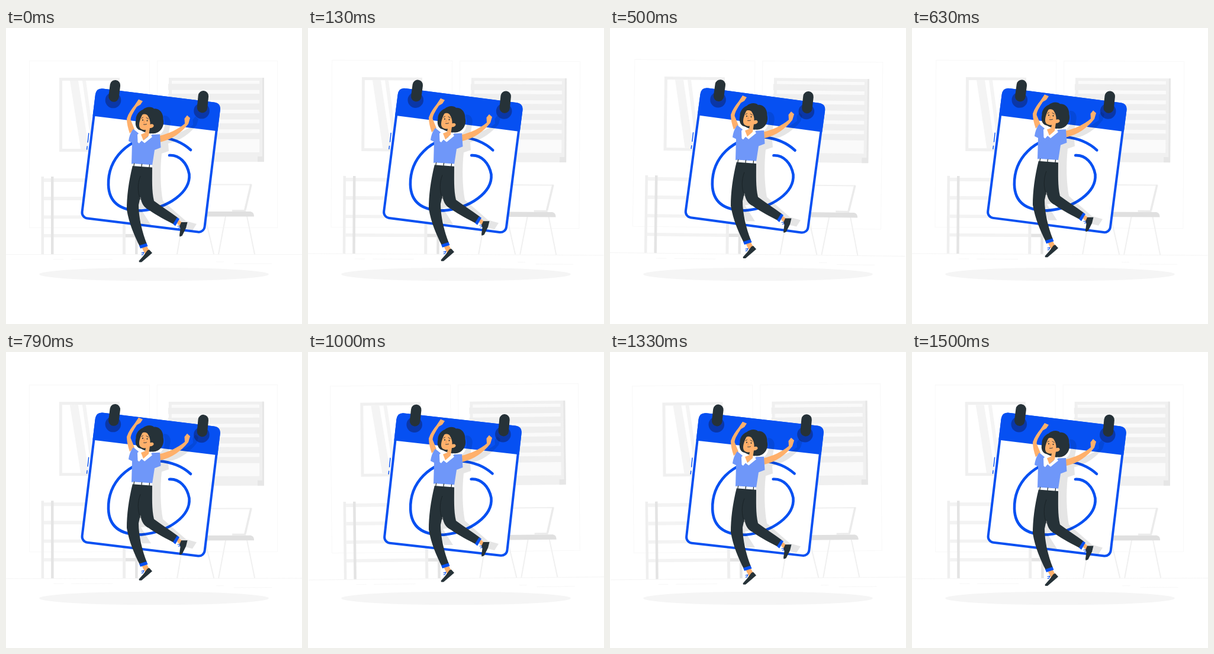
Animation, 500 px wide and 500 px high, one loop 1.54 s. Source, as an HTML page:

```html
<!DOCTYPE html>
<html lang="en">
<head>
<meta charset="utf-8">
<title>Calendar jump</title>
<style>
  html, body { margin: 0; height: 100%; overflow: hidden; background: #fff; }
  svg { display: block; width: 100vw; height: 100vh; }
  .blue { fill: #0650f2; }
  .dark { fill: #263238; }
  .skin { fill: #ffb06b; }
  .white { fill: #fff; }
  .line { fill: none; stroke: #0650f2; stroke-linecap: round; }
  .ink { fill: none; stroke: #263238; stroke-linecap: round; }
</style>
</head>
<body>
<svg viewBox="0 0 500 500">
  <ellipse cx="250" cy="416" rx="194" ry="11.3" fill="#f5f5f5"/>

  <g id="swing">
    <g fill="none" stroke="#f8f8f8">
      <path d="M39.5 55.5H242.5V337.5H39.5ZM255.5 55.5H458.5V337.5H255.5Z"/>
      <path d="M0 382.5H500" stroke="#ededed" stroke-width=".6"/>
      <path d="M80 391H97M110 391H180M355 395H368M385 398H449" stroke="#f2f2f2" stroke-width=".6"/>
    </g>

    <!-- left window -->
    <path fill="#f0f0f0" d="M90 84H192V209H90Z"/>
    <path class="white" d="M95 89H187V204H95Z"/>
    <path fill="#f4f4f4" d="M108 89H122L140 204H126ZM129 89H135L151 204H145Z"/>

    <!-- right window with blinds -->
    <path fill="#f0f0f0" d="M275 84H436V226H275Z"/>
    <path fill="#e6e6e6" d="M433 84H436V226H433ZM425 217H436V226H425Z"/>
    <path fill="#fafafa" d="M280 89H428V210H280Z"/>
    <g id="blinds" fill="#efefef"></g>

    <!-- shelf -->
    <path fill="#f3f3f3" d="M64 254H222V260H64ZM64 285H222V291H64ZM64 316.5H222V322H64ZM64 348H222V353.5H64Z"/>
    <path fill="#efefef" d="M59.5 251H64V382H59.5ZM197 251H202V382H197Z"/>
    <path fill="#e4e4e4" d="M76 251H80.5V382H76ZM218 251H222.5V382H218ZM202 348H218V353.5H202Z"/>

    <!-- chair -->
    <g fill="none" stroke="#f0f0f0" stroke-width="2">
      <path d="M300 318L289 382M336 318L351 382M371 318L359 382M407 318L420 382"/>
      <path d="M330 264.5H414L403 308"/>
      <path d="M414 264L404 307" stroke="#ebebeb" stroke-width="3.5"/>
    </g>
    <path fill="#e0e0e0" d="M310 310H413Q419 311 419 318.5H310Z"/>
    <path fill="#ebebeb" d="M382 307H405V310H382Z"/>

    <!-- calendar -->
    <g transform="translate(245 224) rotate(7)">
      <rect x="-105" y="-108.7" width="208.5" height="218.7" rx="10" class="white" stroke="#0650f2" stroke-width="4"/>
      <path class="blue" d="M-107-63V-99Q-107-110.7-95.5-110.7H94Q105.5-110.7 105.5-99V-63Z"/>
    </g>
    <path class="line" stroke-width="1.4" d="M139.700 178L138.200 193M137.200 200L136.600 205"/>
    <path class="line" stroke-width="4.6" d="M312 206C298 193 280 186 258 184C205 184 172 222 173 265C174 296 195 309 229 308.500C275 304 312 277 309.500 247C306 228 293 214 276 215"/>
    <g fill="#0a37a8">
      <circle cx="181" cy="122" r="13.3"/>
      <circle cx="330.5" cy="140" r="13.3"/>
    </g>
    <path class="ink" stroke-width="17.5" d="M184.400 96.700L182 116M333.400 114.700L331.500 134.500"/>
  </g>

  <g id="jump">
    <!-- cast shadow -->
    <path fill-opacity=".1" d="M266 148C275 147 280 155 277 166L274 182C290 179 306 172 316 163.500L315.500 155L320 149.500L325 154L322 164C310 179 295 190 274 195L275 208L263 212C260 240 261 270 265 292L304 326L322 331L315 342L303 339L270 322L240 304L228 306L245 333H230L215 300L240 240L255 190L258 181C266 177 269 168 268 158Z"/>

    <!-- arms -->
    <path class="skin" d="M217 131L224 120.500L231 123.500L227 129.500L221 133C216 141 211 148 210.500 155L217 171L209 178C206 169 204 161 204 153C207 144 212 137 217 131Z"/>
    <path class="skin" d="M259 182C274 179 291 171 302 161.500L301.500 153L306 147.500L311 152L308 162C296 177 281 188 260 193Z"/>

    <!-- legs -->
    <path class="skin" d="M229 370L237 367L242 376L235 382ZM288 328L291 323L300 331L295 337Z"/>
    <path class="dark" d="M214 232C207 260 204 285 204 307C208 331 217 351 226 369L238 365C230 345 224 320 224 299L227 285C229 297 233 303 241 307C255 317 271 325 284 332L291 321C276 310 262 301 250 292C246 275 247 255 247 234Z"/>
    <path fill="none" stroke="#172024" stroke-width=".8" d="M227 250C222 263 222 277 227 290"/>
    <path class="blue" d="M225 367.500L237.500 363.500L239.500 368.500L227 372.500ZM282 331L289 320L293 322.500L286 334.500Z"/>
    <path class="dark" d="M224.500 393.500L232 385L239 375.500L242 374.500L247 380L239 387L229 395.500H225ZM296 328H306.500L304 338L297.500 351L293.500 352.500L293 350L294.500 339L293 335Z"/>
    <path class="line" stroke-width="1.1" d="M229 380L233 379L231 383L229 383M290 335L293.500 334.500M291.500 338L294 337"/>

    <!-- shirt and belt -->
    <path fill="#6f97f9" d="M215 170.500C210 177 208 184 207 191L213 194L212 229.500L247 232L251 206L261.500 202L260 179.500L247 180L232 192L224 178Z"/>
    <path class="white" d="M214 229L247 231.200V235.500L214 233Z"/>
    <path class="ink" stroke-width="1.3" d="M216.500 229L216 233M229.500 230L229 234M242.500 231L242 235.500"/>

    <!-- hair, face and collar -->
    <path class="dark" d="M219.500 155C219 147 225 140 231 138C236 133 246 132 250 136.500C259 135 266 144 265.500 154C269 168 258 180 246 178C240 179 234 176 228 173C221 172 217 165 219.500 155Z"/>
    <path class="skin" d="M230 147C226 155 223.500 164 226 168.500C228 172 233 172.500 236 172L235 177L227.500 180L231 191L241 182L243 169C247 169 250 167 249.500 164.500C249 162 245 162 243.500 163C244 157 242 152 239 147.500C236 145 232 145 230 147Z"/>
    <path class="white" d="M226.500 176L222 180L222.500 193L225 195L229 190.500L234 194.500L247 184L244 180L232 190Z"/>
    <path fill="#6f97f9" d="M225 195L229 190.500L234 194.500L230 199Z"/>
    <g class="dark">
      <ellipse cx="231" cy="155.5" rx=".9" ry="1.3"/>
      <ellipse cx="238.5" cy="156.5" rx=".9" ry="1.3"/>
    </g>
    <path class="ink" stroke-width=".9" d="M229 152.500L231.500 151M237 151.500L240.500 153.500M232.500 163Q235 163.500 237.500 162.500"/>
    <path fill="none" stroke="#e88b4a" stroke-width=".8" d="M234.300 156L232.600 160H234.300"/>
  </g>
</svg>
<script>
  const LOOP = 1540;
  const byId = id => document.getElementById(id);
  const swing = byId('swing'), jump = byId('jump');

  byId('blinds').innerHTML = Array.from({ length: 6 }, (_, i) =>
    `<rect x="274" y="${94.3 + 16.6 * i}" width="156" height="10.5"/>`).join('');

  // Triangle wave: 0, 1 at a quarter, -1 at three quarters
  const triangle = p => p < .25 ? 4 * p : p < .75 ? 2 - 4 * p : 4 * p - 4;

  function draw() {
    const p = performance.now() % LOOP / LOOP;
    const lift = 10 * (1 - Math.abs(1 - 2 * p));
    swing.setAttribute('transform', `rotate(${triangle(p)} 250 250)`);
    jump.setAttribute('transform', `translate(0 ${-lift})`);
    requestAnimationFrame(draw);
  }
  draw();
</script>
</body>
</html>
```
